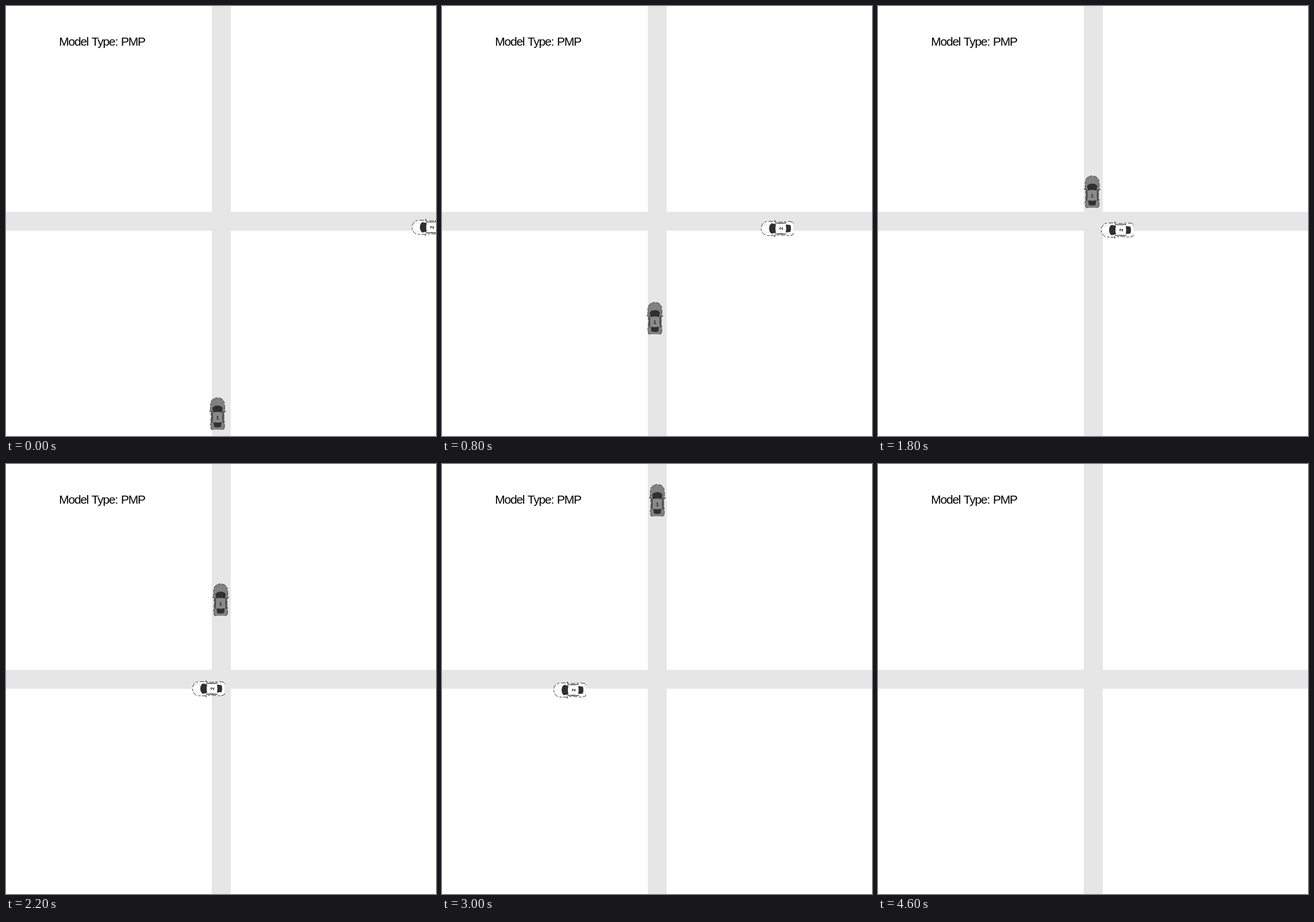
Write an HTML page that moves like this. It is 748 by 748 pixels and loops after 5800 ms.

```html
<!DOCTYPE html>
<html lang="en">
<head>
<meta charset="utf-8">
<title>Crossing cars</title>
<style>
  html, body { margin: 0; width: 100%; height: 100%; overflow: hidden; background: #fff; }
  svg { display: block; width: 100%; height: 100%; }
  .title { font: 21px "Liberation Sans", Arial, sans-serif; letter-spacing: -1.25px; word-spacing: 1.4px; }
  .number { font: bold 9px "Liberation Sans", Arial, sans-serif; text-anchor: middle; fill: #222; }
  .grey { --body: #828282; --roof: #8a8a8a; --seam: #707070; --edge: #303030; }
  .white { --body: #fff; --roof: #fff; --seam: #b8b8b8; --edge: #181818; }
  .body { fill: var(--body); }
  .edge { fill: none; stroke: var(--edge); stroke-width: .9; stroke-dasharray: 8 2 4 3; }
  .roof { fill: var(--roof); }
  .seam { fill: none; stroke: var(--seam); stroke-width: .7; stroke-dasharray: 2 1.5; }
  .glass { fill: #303030; }
  .trim { fill: none; stroke: #282828; stroke-width: 1.2; }
</style>
</head>
<body>
<svg viewBox="0 0 748 748">
  <defs>
    <!-- Open at the tail, so the rear bumper has no edge line -->
    <path id="shell" d="M-8 56H-10Q-12 55-12.3 47L-11 34-12.3 22V13C-12.3 5-7 .5 0 .5S12.3 5 12.3 13V22L11 34 12.3 47Q12 55 10 56H8"/>
    <!-- Nose at the origin, tail towards positive y -->
    <g id="car">
      <use href="#shell" class="body"/>
      <use href="#shell" class="edge"/>
      <path class="seam" d="M-7 14Q-8 7-4 3M7 14Q8 7 4 3"/>
      <path class="roof" d="M-7.5 25H7.5V44H-7.5Z"/>
      <path class="glass" d="M-9 18Q-6 14 0 14T9 18L7.5 26Q0 24-7.5 26Z"/>
      <path class="glass" d="M-7 43Q0 44.5 7 43L6 51Q0 53-6 51Z"/>
      <path class="trim" d="M-9.7 24L-9 34-9.7 44M9.7 24L9 34 9.7 44M-12 24.5L-14.5 23.5M12 24.5L14.5 23.5"/>
    </g>
  </defs>
  <path fill="#e6e6e6" d="M358 0H391V748H358ZM0 358H748V391H0Z"/>
  <text class="title" x="92.3" y="69">Model Type: PMP</text>
  <g id="northbound" class="grey"><use href="#car"/><text class="number" y="37.5">1</text></g>
  <g id="westbound" class="white"><use href="#car"/><text class="number" y="37.5">2</text></g>
</svg>
<script>
  const LOOP_MS = 5800, STEP_MS = 200;
  const northbound = document.getElementById("northbound");
  const westbound = document.getElementById("westbound");

  // Nose position along the road at each simulation step
  const northNose = [681, 641, 600, 558, 515, 472, 428, 384, 339, 295, 251, 208, 164, 121, 78, 35, -8, -51];
  const westNose = [706, 667, 629, 591, 555, 520, 487, 453, 420, 388, 356, 324, 292, 259, 226, 194, 161, 128, 94, 62, 28, -5, -38];

  // Sideways drift across the lane
  const northDrift = k => 368 + 0.62 * k - 0.012 * k * k;
  const westDrift = k => 385 + 0.5 * k + 0.003 * k * k;

  function place(car, visible, x, y, turn) {
    car.setAttribute("visibility", visible ? "visible" : "hidden");
    if (visible) car.setAttribute("transform", `translate(${x} ${y}) rotate(${turn})`);
  }

  function draw() {
    const k = Math.floor(performance.now() % LOOP_MS / STEP_MS);
    place(northbound, k < northNose.length, northDrift(k), northNose[k], 0);
    place(westbound, k < westNose.length, westNose[k], westDrift(k), -90);
    requestAnimationFrame(draw);
  }
  draw();
</script>
</body>
</html>
```
